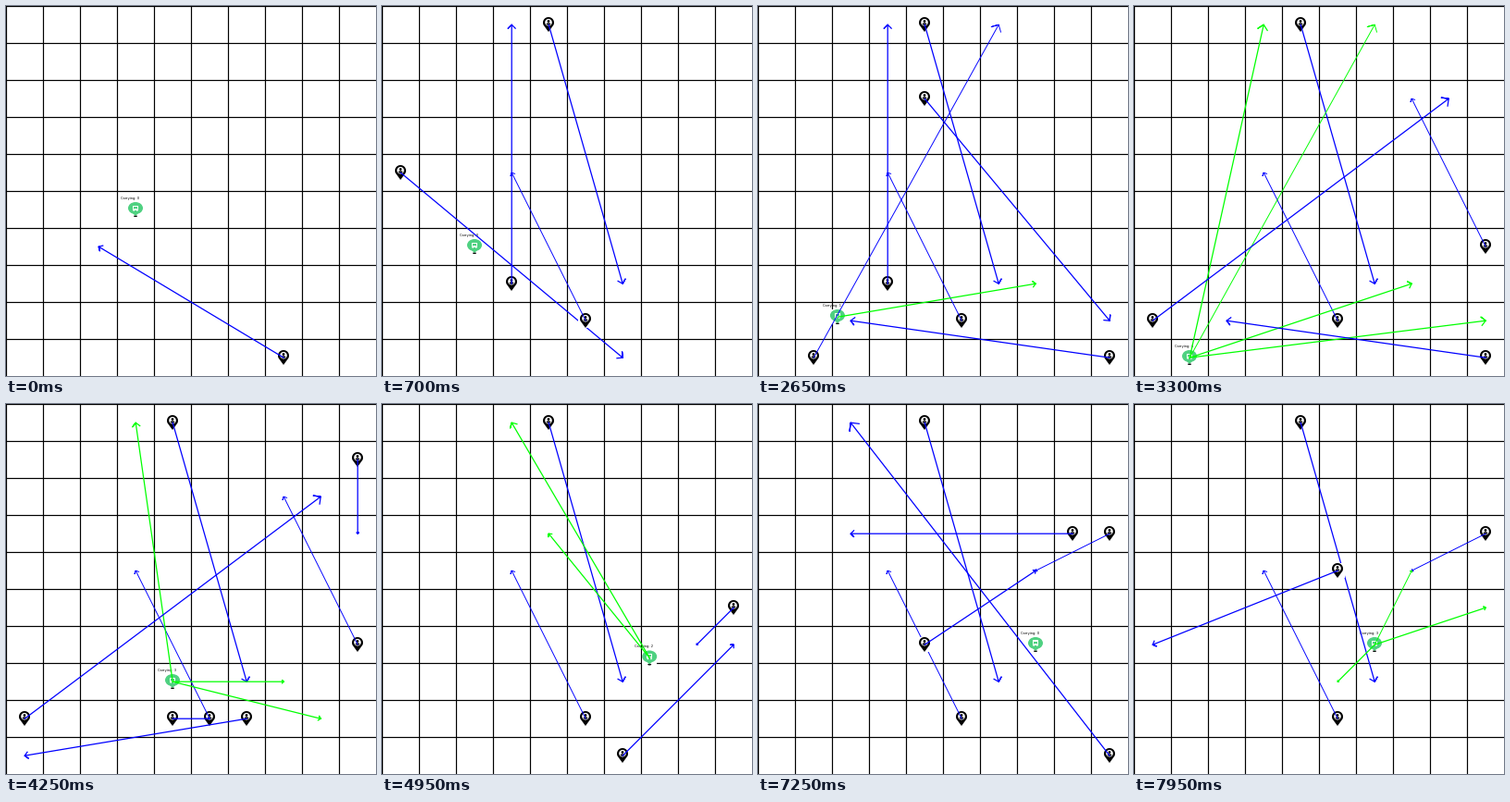
Write a matplotlib script that moves like this. It is 400 px wide and 400 px high and loops after 8000 ms.

```python
import math

import matplotlib.pyplot as plt
import numpy as np
from matplotlib.animation import FuncAnimation
from matplotlib.lines import Line2D
from matplotlib.patches import Circle, Ellipse, Polygon, Rectangle

SIZE, CELL, DPI = 400, 40, 100
STEP, FRAMES = 50, 160
PX = 72 / DPI
BLUE, GREEN, SHUTTLE = "#0000ff", "#00ff00", "#4fd181"

# Ride requests: origin cell, destination cell (column row), time of the call
RIDES = [
    ("79", "26", 0), ("04", "69", 350), ("40", "67", 200), ("58", "34", 450),
    ("37", "30", 600), ("42", "98", 1100), ("42", "48", 1600), ("09", "77", 2300),
    ("19", "60", 2400), ("99", "28", 2500), ("47", "88", 3700), ("08", "82", 3250),
    ("91", "93", 4000), ("96", "72", 3300), ("48", "58", 4100), ("68", "09", 4050),
    ("48", "43", 4600), ("95", "86", 4650), ("69", "96", 4850), ("56", "10", 5850),
    ("09", "30", 5900), ("99", "20", 6000), ("83", "23", 6100), ("93", "74", 6200),
    ("54", "06", 7500), ("46", "74", 7150), ("77", "95", 7300), ("66", "57", 7600),
]

# Shuttle trips: start, end, stops (P = pick up, D = drop off)
TRIPS = [
    (0, 700, "P0 D0"),
    (880, 1400, "P1 D1"),
    (2150, 2550, "P6 D6 P7"),
    (2550, 2732, "P4"),
    (2850, 3100, "P5"),
    (3200, 3300, "P8"),
    (3600, 3750, "P9"),
    (3900, 4245, "D5 D8 D9 P10"),
    (4250, 4790, "P14 D14 P15 D7 D10 P13 P12 D12 D13 P11 D15 D11 P16"),
    (4820, 5320, "P17 D17 D16"),
    (5440, 5650, "P18"),
    (5780, 6343, "D18 P19 D4"),
    (6500, 6650, "D19"),
    (6880, 7700, "P20 D20 P21 D21 P22 D22 P25"),
    (7720, 7800, "P26"),
    (7890, 7940, "P27"),
]


def centre(cell):
    return tuple(CELL * int(c) + CELL / 2 for c in cell)


def plan(start):
    """Key points of the shuttle path, and the times of each pick-up and drop."""
    keys, picked, dropped = [(0, *start)], {}, {}
    here = start
    for t0, t1, stops in TRIPS:
        path, names = [here], stops.split()
        for name in names:
            origin, goal, _ = RIDES[int(name[1:])]
            path.append(centre(origin if name[0] == "P" else goal))
        way = np.cumsum([math.dist(a, b) for a, b in zip(path, path[1:])])
        keys.append((t0, *here))
        for name, point, d in zip(names, path[1:], way):
            t = t0 + (t1 - t0) * d / way[-1]
            keys.append((t, *point))
            (picked if name[0] == "P" else dropped)[int(name[1:])] = t
        here = path[-1]
    return np.array(keys), picked, dropped


KEYS, PICKED, DROPPED = plan(centre("35"))

fig = plt.figure(figsize=(SIZE / DPI, SIZE / DPI), dpi=DPI, facecolor="white")
ax = fig.add_axes([0, 0, 1, 1])
ax.set_xlim(0, SIZE)
ax.set_ylim(SIZE, 0)
ax.axis("off")
for p in range(0, SIZE, CELL):
    ax.axvline(p + 0.2, color="black", lw=1.2 * PX, zorder=1)
    ax.axhline(p + 0.2, color="black", lw=1.2 * PX, zorder=1)

live = []


def put(artist):
    artist.set_zorder(3 + len(live))
    ax.add_artist(artist)
    live.append(artist)


def shape(kind, *args, color, **kw):
    put(kind(*args, facecolor=color, edgecolor="none", **kw))


def backing(x, y):
    shape(Rectangle, (x - 8, y - 8), 16, 16, color="white")


def teardrop(x, y, rx, ry, cy, tip, color):
    a = np.radians(np.linspace(-25, 205, 40))
    pts = np.column_stack([x + rx * np.cos(a), y + cy - ry * np.sin(a)])
    shape(Polygon, np.vstack([pts, (x, y + tip)]), color=color)


def pin(x, y):
    backing(x, y)
    teardrop(x, y, 6, 6, -2, 8, "black")
    shape(Circle, (x, y - 2.3), 3.8, color="white")
    shape(Circle, (x, y - 3.5), 1.4, color="black")
    shape(Ellipse, (x, y - 0.5), 4.6, 2.4, color="black")


def shuttle(x, y, load):
    backing(x, y)
    shape(Ellipse, (x, y + 7.2), 4, 1.6, color="black")
    shape(Ellipse, (x, y - 1.5), 16, 13, color=SHUTTLE)
    teardrop(x, y, 6, 4, 0, 7, SHUTTLE)
    shape(Rectangle, (x - 3, y - 4.5), 6, 5.4, color="white")
    shape(Rectangle, (x - 2.2, y - 3.4), 4.4, 2, color=SHUTTLE)
    for side in (-1.8, 1.8):
        shape(Circle, (x + side, y + 1), 0.8, color="white")
        shape(Circle, (x + side, y - 0.3), 0.45, color=SHUTTLE)
    put(plt.Text(x - 16, y - 11.3, f"Carrying: {load}", color="black",
                 fontsize=2.65, fontfamily="DejaVu Sans", va="baseline"))


def arrow(tail, tip, color):
    (x0, y0), (x1, y1) = tail, tip
    dx, dy = x0 - x1, y0 - y1
    head, back = 0.02 * math.hypot(dx, dy), math.atan2(dy, dx)
    a, b = [(x1 + head * math.cos(back + s), y1 + head * math.sin(back + s))
            for s in (math.pi / 4, -math.pi / 4)]
    pts = np.array([tail, tip, a, tip, b]) + 0.2
    low, high = sorted((abs(dx), abs(dy)))
    width = 0.95 if 0.44 < low / max(high, 1) < 0.57 else 1.25
    put(Line2D(pts[:, 0], pts[:, 1], color=color, lw=width * PX,
               solid_joinstyle="round"))


def draw(frame):
    t = frame * STEP
    while live:
        live.pop().remove()
    bus = tuple(np.interp(t, KEYS[:, 0], KEYS[:, i]) for i in (1, 2))
    never = FRAMES * STEP
    riding = [PICKED.get(i, never) <= t < DROPPED.get(i, never)
              for i in range(len(RIDES))]
    shuttle(*bus, sum(riding))
    for i, (origin, goal, call) in enumerate(RIDES):
        if riding[i]:
            arrow(bus, centre(goal), GREEN)
        elif call <= t < PICKED.get(i, never):
            pin(*centre(origin))
            arrow(centre(origin), centre(goal), BLUE)
    return live


anim = FuncAnimation(fig, draw, frames=FRAMES, interval=STEP,
                     init_func=lambda: [], repeat=True, repeat_delay=0)
plt.show()
```
